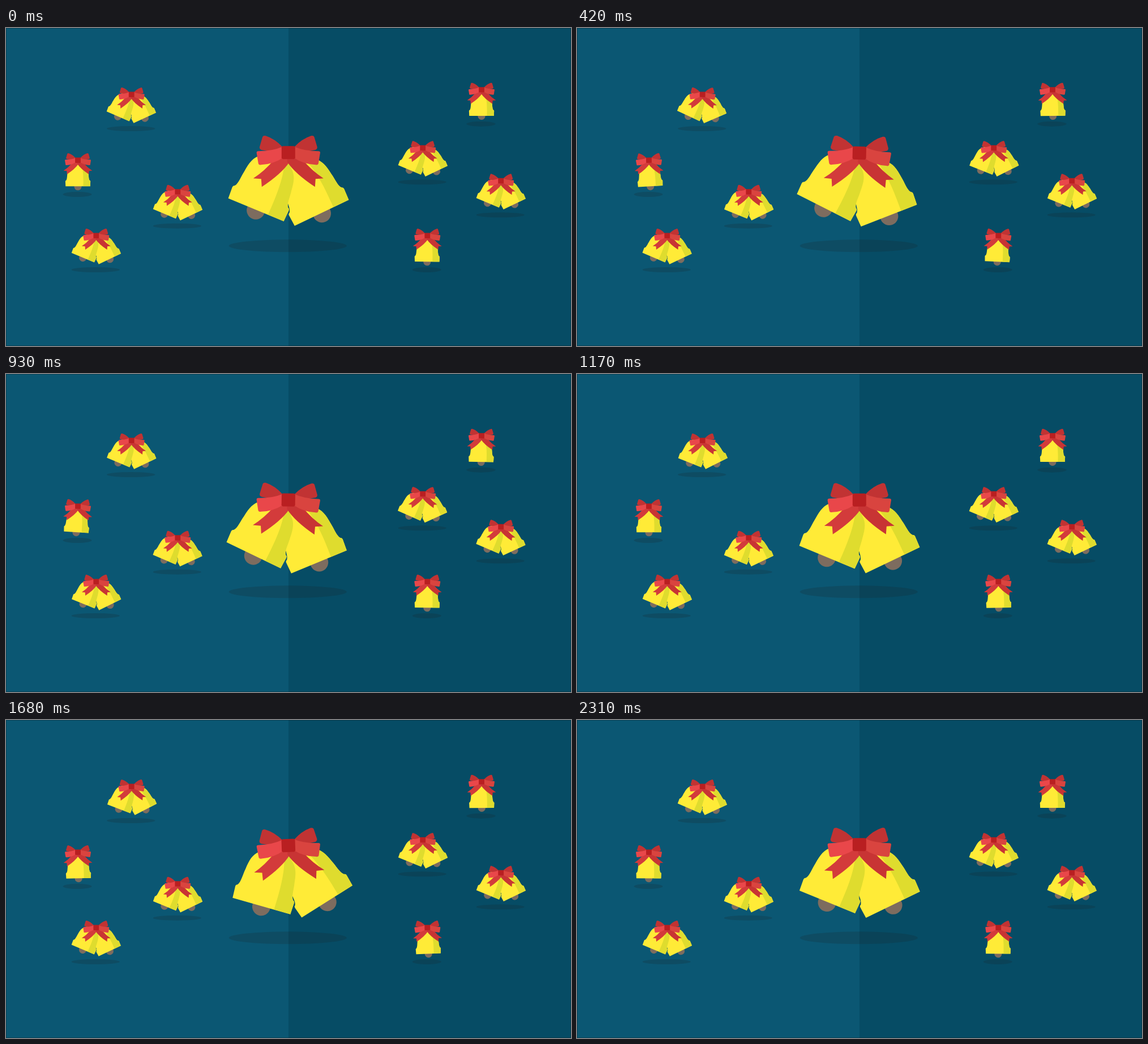
An HTML page with a canvas that plays this animation: 998x561 px, repeating every 2.34 s.

```html
<!DOCTYPE html>
<html>
<head>
<meta charset="utf-8">
<style>
  html, body { margin: 0; overflow: hidden; background: #0b5773; }
  canvas { display: block; }
</style>
</head>
<body>
<canvas id="stage" width="998" height="561"></canvas>
<script>
const ctx = document.getElementById('stage').getContext('2d');
const LOOP = 2340, STEP = 30, TURN = 2 * Math.PI, DEGREE = Math.PI / 180;

// Shapes are drawn around the knot of the bow.
const bellBody = new Path2D('M-53 113L-54 92Q-54 89-51 88C-46 82-47 68-45 58C-43 40-40 30-30 22'
  + 'Q-18 8 0 8Q18 8 30 22C40 30 43 40 45 58C47 68 46 82 51 88Q54 89 54 92L53 113Z');
const bellShade = new Path2D('M12 9C24 40 24 75 23 113H60V9Z');
const tail = new Path2D('M-26 14Q-42 33-62 46L-48 47L-47 61Q-12 38 2 17V0H-16Z');
const backLoop = new Path2D('M-10-9Q-24-24-40-29Q-45-30-46-26L-51-9Q-51-5-47-4L-10 2Z');
const frontLoop = new Path2D('M-10-10Q-28-2-53-2Q-57-2-56 2L-53 20Q-52 23-48 22Q-27 21-10 10Z');
const knot = new Path2D('M-10-11H10L12-9V10L10 12H-10L-12 10V-9Z');

// Each kind lists its single bells as [x, y, degrees].
const PAIR = { parts: [[10, 5, -25.6], [-14, -3, 22.5]], shadowWidth: 104 };
const SINGLE = { parts: [[0, 0, 0]], shadowWidth: 62 };

// swing is the largest tilt in degrees, cycles the swings per loop.
const small = (kind, x, y, swing, cycles, phase = 0) => ({
  kind, x, y, swing, cycles, phase,
  scale: .41, pivot: 0, lift: kind === PAIR ? -6 : 0, bob: 0, drop: 60.5
});
const groups = [
  small(PAIR, 221.7, 117, 2.3, 1, .1),
  small(PAIR, 303.3, 288.7, -.8, 2),
  small(PAIR, 159.3, 366, .8, 2),
  small(PAIR, 736.2, 211.3, -1.6, 2),
  small(PAIR, 874.2, 269.3, -.8, 2),
  small(SINGLE, 127, 233, -5, 2),
  small(SINGLE, 840, 108.7, -1.3, 2),
  small(SINGLE, 744.3, 366, 3, 1, .06),
  {
    kind: PAIR, x: 498.8, y: 219.3, swing: 6.7, cycles: 1, phase: 0,
    scale: 1, pivot: 21, lift: 0, bob: 1.25, drop: 165
  }
];

// Steady swing from 0 to 1, over to -1 and back to 0.
function swingAt(turns) {
  const peak = .28, u = turns % 1;
  if (u < peak) return u / peak;
  if (u > 1 - peak) return (u - 1) / peak;
  return (.5 - u) / (.5 - peak);
}

function fill(color, path) {
  ctx.fillStyle = color;
  ctx.fill(path);
}

function ellipse(color, x, y, rx, ry) {
  ctx.fillStyle = color;
  ctx.beginPath();
  ctx.ellipse(x, y, rx, ry, 0, 0, TURN);
  ctx.fill();
}

function drawBell([x, y, degrees]) {
  ctx.save();
  ctx.translate(x, y);
  ctx.rotate(degrees * DEGREE);
  ellipse('#7d6c5f', 0, 114, 16, 16);
  fill('#ffeb37', bellBody);
  ctx.clip(bellBody);
  fill('#dfdc2e', bellShade);
  ctx.restore();
}

function drawMirrored(path, left, right) {
  fill(left, path);
  ctx.scale(-1, 1);
  fill(right, path);
  ctx.scale(-1, 1);
}

function drawBow() {
  drawMirrored(tail, '#d33b3b', '#c83434');
  drawMirrored(backLoop, '#c13333', '#c13333');
  drawMirrored(frontLoop, '#e9474a', '#d9443f');
  fill('#b91f21', knot);
}

function drawGroup({ kind, x, y, swing, cycles, phase, scale, pivot, lift, bob, drop }, time) {
  const tilt = swing * swingAt(cycles * time + phase) * DEGREE;
  ellipse('rgba(30,30,30,.18)', x - 1, y + drop, kind.shadowWidth * scale, 11 * scale);

  ctx.save();
  ctx.translate(x, y + bob * (1 - Math.cos(TURN * time)));
  ctx.scale(scale, scale);
  ctx.save();
  ctx.translate(0, pivot);
  ctx.rotate(tilt);
  ctx.translate(0, lift - pivot);
  kind.parts.forEach(drawBell);
  ctx.restore();
  ctx.rotate(tilt * .3);
  drawBow();
  ctx.restore();
}

let start;
function frame(now) {
  start ??= now;
  const time = Math.floor((now - start) % LOOP / STEP) * STEP / LOOP;
  ctx.fillStyle = '#0b5773';
  ctx.fillRect(0, 0, 499, 561);
  ctx.fillStyle = '#064c65';
  ctx.fillRect(499, 0, 499, 561);
  ctx.strokeStyle = 'rgba(0,0,0,.25)';
  ctx.strokeRect(.5, .5, 997, 560);
  for (const group of groups) drawGroup(group, time);
  requestAnimationFrame(frame);
}
requestAnimationFrame(frame);
</script>
</body>
</html>
```
